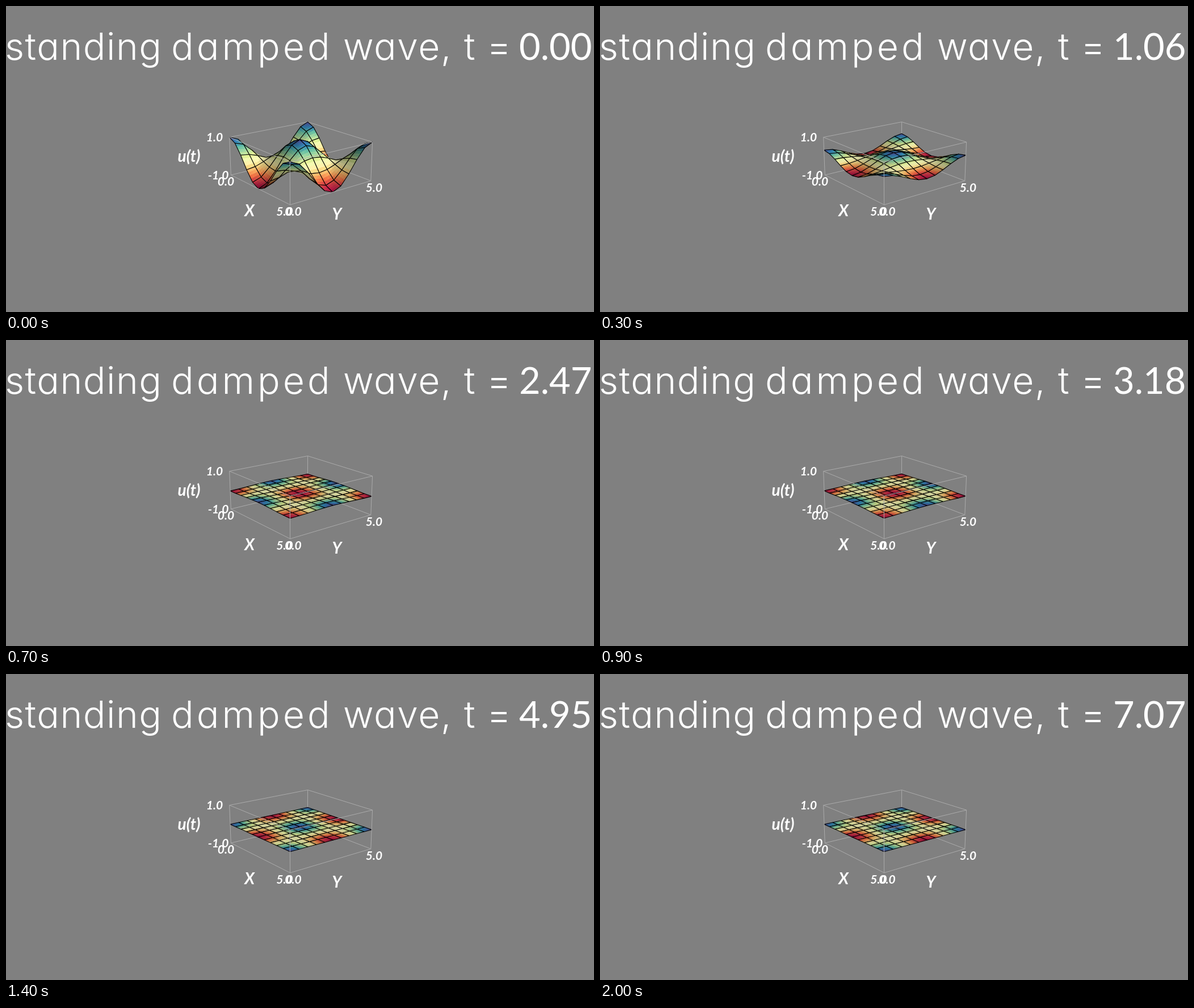
An HTML page with a canvas that plays this animation: 1036x540 px, repeating every 2100 ms.

```html
<!DOCTYPE html>
<html lang="en">
<head>
<meta charset="utf-8">
<title>Standing damped wave</title>
<style>
  html, body { margin: 0; width: 100%; height: 100%; overflow: hidden; background: #808080; }
  canvas, svg { position: absolute; left: 0; top: 0; }
  text { fill: #fff; }
  .title { font: 350 66px Inter, sans-serif; font-feature-settings: "cv11"; letter-spacing: 1.5px; }
  .wide { letter-spacing: 5px; }
  .time { font: 400 65px Lato, sans-serif; }
  .tick, .axis { font: italic 700 21px Lato, sans-serif; text-anchor: middle; }
  .axis { font-size: 28px; }
</style>
</head>
<body>
<canvas id="plot" width="1036" height="540"></canvas>
<svg width="1036" height="540">
  <g class="title">
    <text x="-2" y="95">standing</text>
    <text class="wide" x="291" y="95">damped</text>
    <text x="594" y="95">wave,</text>
    <text x="807" y="95">t</text>
    <text x="847" y="95">=</text>
  </g>
  <text class="time" id="time" x="904" y="95">0.00</text>
  <g class="tick">
    <text x="367.5" y="238.5">1.0</text>
    <text x="374" y="305.5">-1.0</text>
    <text x="387.5" y="317">0.0</text>
    <text x="491" y="370">5.0</text>
    <text x="506" y="370">0.0</text>
    <text x="648.5" y="327.5">5.0</text>
  </g>
  <g class="axis">
    <text x="322.5" y="275">u(t)</text>
    <text x="429" y="370.5">X</text>
    <text x="583" y="376.5">Y</text>
  </g>
</svg>
<script>
const STEPS = 21, STEP_MS = 100, DT = Math.SQRT2 / 4;
const CELLS = 10, SUB = 4, SIZE = 5, H = SIZE / CELLS;
const CENTER = [517.8, 269.9], SCALE = 35.5, DISTANCE = 1005;
const AZIMUTH = 52 * Math.PI / 180, ELEVATION = 18 * Math.PI / 180;
const PALETTE = ['a60641', 'd23449', 'f46d43', 'fdae61', 'fee08b', 'ffffbf',
                 'e6f598', 'abdda4', '66c2a5', '3288bd', '5e4fa2']
  .map(hex => [0, 2, 4].map(k => parseInt(hex.slice(k, k + 2), 16)));

// Camera-space lights: elevation, azimuth (degrees), intensity.
const LIGHTS = [[45, 45, 1], [-30, -60, 0.6], [-30, 60, 0.5]].map(([el, az, power]) => {
  const e = el * Math.PI / 180, a = az * Math.PI / 180;
  return [Math.cos(e) * Math.sin(a), Math.sin(e), Math.cos(e) * Math.cos(a)].map(v => v * power);
});

const ctx = document.getElementById('plot').getContext('2d');
const timeText = document.getElementById('time');
const dot = (a, b) => a[0] * b[0] + a[1] * b[1] + a[2] * b[2];

// Damped oscillator released from rest.
function amplitude(t) {
  const decay = 1.3, omega = 2 * Math.SQRT2 * Math.PI / SIZE;
  const w = Math.sqrt(omega * omega - decay * decay);
  return Math.exp(-decay * t) * (Math.cos(w * t) + decay / w * Math.sin(w * t));
}

// Mode shape and its slope, linear between the grid nodes.
const modeAt = i => Math.cos(Math.PI * i / 5);
function slopeAt(i) {
  const lo = Math.max(i - 1, 0), hi = Math.min(i + 1, CELLS);
  return (modeAt(hi) - modeAt(lo)) / ((hi - lo) * H);
}
function lerpNodes(f, s) {
  const i = Math.min(Math.floor(s), CELLS - 1), k = s - i;
  return f(i) * (1 - k) + f(i + 1) * k;
}
const mode = s => lerpNodes(modeAt, s);
const slope = s => lerpNodes(slopeAt, s);

// World vector to camera axes: right, up, toward the viewer.
function rotate(x, y, z) {
  const right = x * Math.cos(AZIMUTH) + y * Math.sin(AZIMUTH);
  const away = y * Math.cos(AZIMUTH) - x * Math.sin(AZIMUTH);
  return [right,
          away * Math.sin(ELEVATION) + z * Math.cos(ELEVATION),
          z * Math.sin(ELEVATION) - away * Math.cos(ELEVATION)];
}
const toCamera = (x, y, z) => rotate(x - SIZE / 2, y - SIZE / 2, z).map(v => v * SCALE);
function project(x, y, z) {
  const [r, u, toward] = toCamera(x, y, z);
  const k = DISTANCE / (DISTANCE - toward);
  return [CENTER[0] + r * k, CENTER[1] - u * k];
}

function paletteColor(v) {
  const s = Math.max(0, Math.min(1, v)) * (PALETTE.length - 1);
  const i = Math.min(Math.floor(s), PALETTE.length - 2);
  return PALETTE[i].map((c, n) => c + (PALETTE[i + 1][n] - c) * (s - i));
}

function surfaceColor(i, j, amp) {
  const cx = mode(i), cy = mode(j);
  let n = rotate(-amp * slope(i) * cy, -amp * cx * slope(j), 1);
  const p = toCamera(i * H, j * H, amp * cx * cy);
  const facing = dot(n, [-p[0], -p[1], DISTANCE - p[2]]) < 0 ? -1 : 1;
  const length = Math.hypot(...n) * facing;
  n = n.map(v => v / length);
  const light = Math.min(1, LIGHTS.reduce((sum, l) => sum + Math.max(0, dot(n, l)), 0));
  const rgb = paletteColor((1 + Math.sign(amp) * cx * cy) / 2);
  return `rgb(${rgb.map(c => Math.round(c * light))})`;
}

function path(points) {
  ctx.beginPath();
  points.forEach(p => ctx.lineTo(...p));
}

function drawCell(i, j, amp) {
  const at = (a, b) => project(a * H, b * H, amp * mode(a) * mode(b));
  const quad = (a, b, d) => [at(a, b), at(a + d, b), at(a + d, b + d), at(a, b + d)];
  const d = 1 / SUB;
  ctx.lineWidth = 0.7;
  for (let a = 0; a < SUB; a++) {
    for (let b = 0; b < SUB; b++) {
      path(quad(i + a * d, j + b * d, d));
      ctx.closePath();
      ctx.fillStyle = ctx.strokeStyle = surfaceColor(i + (a + 0.5) * d, j + (b + 0.5) * d, amp);
      ctx.fill();
      ctx.stroke();
    }
  }
  path(quad(i, j, 1));
  ctx.closePath();
  ctx.lineWidth = 1.1;
  ctx.strokeStyle = '#000';
  ctx.stroke();
}

function drawBox(lines) {
  ctx.lineWidth = 1;
  ctx.strokeStyle = '#ababab';
  for (const line of lines) {
    path(line.map(p => project(...p)));
    ctx.stroke();
  }
}

const left = z => [0, 0, z], front = z => [SIZE, 0, z];
const right = z => [SIZE, SIZE, z], back = z => [0, SIZE, z];
const rearBox = [[left(1), back(1), right(1)], [left(-1), back(-1), right(-1)], [back(-1), back(1)]];
const nearBox = [[left(1), front(1), right(1)], [left(-1), front(-1), right(-1)],
                 ...[left, front, right].map(c => [c(-1), c(1)])];

const cells = Array.from({ length: CELLS * CELLS }, (_, n) => [n % CELLS, Math.floor(n / CELLS)]);
const nearness = ([i, j]) => rotate(i, j, 0)[2];
cells.sort((a, b) => nearness(a) - nearness(b));

function draw(step) {
  const t = step * DT, amp = amplitude(t);
  ctx.fillStyle = '#808080';
  ctx.fillRect(0, 0, 1036, 540);
  drawBox(rearBox);
  cells.forEach(([i, j]) => drawCell(i, j, amp));
  drawBox(nearBox);
  timeText.textContent = t.toFixed(2);
}

ctx.lineJoin = 'round';
const start = performance.now();
let shown = -1;
function tick() {
  const step = Math.floor((performance.now() - start) / STEP_MS) % STEPS;
  if (step !== shown) draw(shown = step);
  requestAnimationFrame(tick);
}
tick();
</script>
</body>
</html>
```
